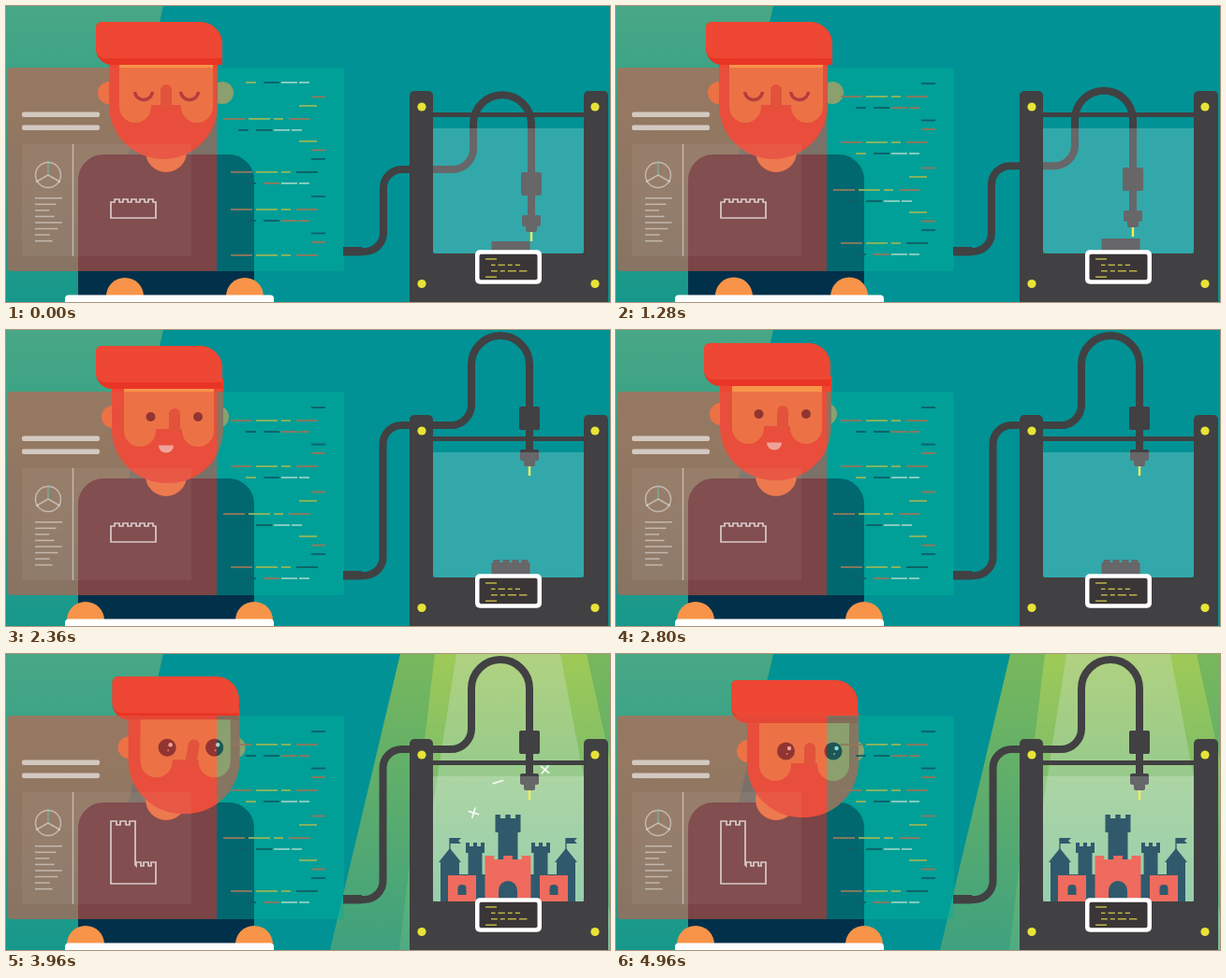
An HTML page with a canvas that plays this animation: 645 by 317 pixels, repeating every 5 s.

```html
<!DOCTYPE html>
<html lang="en">
<head>
<meta charset="utf-8">
<title>3D printing</title>
<style>
html, body { margin: 0; width: 100%; height: 100%; overflow: hidden; background: #009294; }
canvas { display: block; }
</style>
</head>
<body>
<canvas id="stage" width="645" height="317"></canvas>
<script>
const c = document.getElementById('stage').getContext('2d');
const LOOP = 5000, DARK = '#414042', SKIN = '#f7944a', RED = '#ee4733', NAVY = '#305a6c', CORAL = '#ef6b5e';

const clamp = v => Math.max(0, Math.min(1, v));
const mix = (a, b, p) => a + (b - a) * p;
const ramp = (t, from, to) => {
  const p = clamp((t - from) / (to - from));
  return p * p * (3 - 2 * p);
};
const random = i => Math.abs(Math.sin(i * 127.1 + 3) * 43758.5) % 1;

function box(x, y, w, h, fill, r = 0) {
  c.fillStyle = fill;
  c.beginPath();
  c.roundRect(x, y, w, h, r);
  c.fill();
}
function arc(x, y, r, fill, end = 7) {
  c.fillStyle = fill;
  c.beginPath();
  c.arc(x, y, r, 0, end);
  c.fill();
}
function poly(fill, ...p) {
  c.fillStyle = fill;
  c.beginPath();
  for (let i = 0; i < p.length; i += 2) c.lineTo(p[i], p[i + 1]);
  c.fill();
}
function line(color, width, x0, y0, x1, y1) {
  c.strokeStyle = color;
  c.lineWidth = width;
  c.beginPath();
  c.moveTo(x0, y0);
  c.lineTo(x1, y1);
  c.stroke();
}
function group(draw, alpha = 1) {
  c.save();
  c.globalAlpha = alpha;
  draw();
  c.restore();
}

// Beam from the top edge to the bottom edge with a vertical gradient
function beam(alpha, top, bottom, topLeft, topRight, bottomLeft, bottomRight) {
  const fill = c.createLinearGradient(0, 0, 0, 317);
  fill.addColorStop(0, top);
  fill.addColorStop(1, bottom);
  group(() => poly(fill, topLeft, 0, topRight, 0, bottomRight, 317, bottomLeft, 317), alpha);
}

function background(t) {
  box(0, 0, 645, 317, '#009294');
  beam(1, '#48a785', '#17988b', 0, 168, 0, 94);
  const on = clamp((t - 3360) / 110), spread = ramp(t, 3480, 3760);
  beam(on * mix(.15, 1, spread), '#78b85c', '#3fa17e', 421, 660, 346, 660);
  beam(on, mix(0, 1, spread) > .5 ? '#9fca57' : '#6fb658', '#4fab82',
    mix(448, 458, spread), mix(660, 620, spread), mix(374, 420, spread), 690);
  beam(spread, '#b0d280', '#74bf9e', 481, 592, 432, 652);
}

// Continues the current path with n merlons of the given width and gap
function merlons(n, x, y, width, gap, height) {
  for (let i = 0; i < n; i++) {
    const left = x + i * (width + gap), right = left + width;
    c.lineTo(left, y + height);
    c.lineTo(left, y);
    c.lineTo(right, y);
    c.lineTo(right, y + height);
  }
}

function shirtIcon(t) {
  c.strokeStyle = '#fff';
  c.lineWidth = 1.7;
  c.beginPath();
  if (t < 3700) {
    c.moveTo(112, 227);
    c.lineTo(112, 210);
    merlons(5, 116, 207, 5, 4, 3);
    c.lineTo(160, 210);
    c.lineTo(160, 227);
  } else {
    c.moveTo(112, 246);
    merlons(3, 112, 179, 6, 4, 4);
    c.lineTo(138, 226);
    merlons(3, 139, 223, 5, 3, 4);
    c.lineTo(160, 246);
  }
  c.closePath();
  c.stroke();
}

function eye(x, t) {
  const wide = ramp(t, 3640, 3860);
  if (t < 1740) {
    c.strokeStyle = '#7f2035';
    c.lineWidth = 3.5;
    c.beginPath();
    c.arc(x, 91, 9.5, .1, Math.PI - .1);
    c.stroke();
    return;
  }
  arc(x, 93, mix(5, 9.5, wide), '#33101f');
  arc(x + 3.5, 90, 2.2 * wide, '#fff');
  arc(x + 1, 96, wide, '#d9a9a0');
}

function head(t) {
  const awake = ramp(t, 1680, 1800), look = ramp(t, 3780, 4080);
  const nod = Math.sin(Math.PI * clamp((t - 2640) / 320));
  c.translate(27 * look - 2 * nod, 11 * look - 3 * nod);
  arc(110 + 4 * awake, 93, 12, SKIN);
  arc(231 - 5 * awake, 93, 12, SKIN);
  box(110 + 3 * awake, 52, 116 + 3 * awake, 112, RED, [0, 0, 58, 58]);
  const left = 121 + 5 * awake, right = 187 + awake;
  box(left, 58, right + 34 - left, 48, SKIN);
  for (const x of [left, right]) box(x, 80, 34, 45, SKIN, [0, 0, 17, 17]);
  group(() => {
    c.translate(171 + 9 * awake, 107);
    c.rotate(.2 * Math.sin(Math.PI * look));
    box(-6, -23, 12, 25, '#e44e32', [6, 6, 0, 0]);
  });
  eye(147 + 7.5 * awake, t);
  eye(196 + 9 * awake, t);
  if (t < 2240) arc(176, 125, 4.8 * ramp(t, 1760, 1840), '#fee');
  else if (t < 3720) arc(171, 123.5, 8, '#fff', Math.PI);
  box(96, 17, 135, 46, '#e93525', [6, 24, 0, 17]);
  box(96, 17, 135, 39, RED, [6, 24, 0, 10]);
}

const INK = { r: '#94785c', y: '#93b65a', d: '#0e6066', w: '#90d0c2' };
// Pairs of code lines: top, left, inks of both lines, inks of the marks above
const PAIRS = [[121, 232, 'ryyr', 'ddww', 'yr'], [178, 240, 'ryyd', 'drww', 'dry'],
  [218, 240, 'ryyr', 'ddrr', 'd'], [267, 240, 'ryyr', 'ydww', 'rd']];
function code(t) {
  const scroll = Math.min(121, t * .1);
  const dash = (ink, x, y, w) => {
    const wrapped = 75 + (y - 75 - scroll + 394) % 197;
    box(x, wrapped - .9, w, 1.8, INK[ink]);
  };
  group(() => {
    c.beginPath();
    c.rect(225, 75, 136, 197);
    c.clip();
    for (const [y, x, long, short, marks] of PAIRS) {
      [...long].forEach((ink, i) => dash(ink, x + i * 27 - (i > 2 ? 11 : 0), y, i === 2 ? 10 : 23));
      [...short].forEach((ink, i) => dash(ink, x + 16 + i * 19, y + 12, i % 3 ? 17 : 11));
      [...marks].forEach((ink, i) => dash(ink, ink === 'y' ? 313 : 326, y - 14 - i * 9.5, ink === 'y' ? 19 : 15));
    }
  });
}

function panels(t) {
  box(2, 66, 223, 218, 'rgba(228,86,68,.54)', [3, 0, 0, 3]);
  box(225, 66, 136, 218, 'rgba(0,175,156,.44)', [0, 3, 3, 0]);
  box(17, 148, 181, 120, 'rgba(255,255,255,.05)');
  for (const y of [113.5, 127.5]) box(17, y, 83, 5.5, 'rgba(255,255,255,.6)', 2);
  group(() => {
    line('#fff', 1.5, 71.5, 148, 71.5, 268);
    c.beginPath();
    c.arc(45, 181, 13.5, 0, 7);
    c.stroke();
    for (let i = 0; i < 3; i++) {
      const a = Math.PI * (2 * i / 3 - .5);
      line(i ? '#fff' : '#5fe0c0', 1.5, 45, 181, 45 + 15 * Math.cos(a), 181 + 15 * Math.sin(a));
    }
    for (let i = 0; i < 8; i++) box(31, 205 + i * 6.55, 22 + 7 * Math.cos(i * 1.5), 1.5, '#fff');
  }, .45);
  group(() => shirtIcon(t), .7);
  code(t);
}

function person(t) {
  box(77, 159, 188, 158, '#00304a', [27, 27, 0, 0]);
  arc(171, 156, 22, SKIN);
  group(() => head(t));
  panels(t);
  const rest = ramp(t, 1640, 1800), sway = Math.cos(t / 760 * Math.PI);
  const tap = (1 - sway) * (1 - rest);
  arc(mix(124.5 + 2.5 * sway, 85, rest), 311 - tap, 20, SKIN);
  arc(mix(242 + 13 * sway, 265, rest), 311 - tap, 20, SKIN);
  box(63, 309.5, 223, 12, '#fff', 4);
}

function printHead(t) {
  const x = mix(541 + 20 * Math.cos(Math.min(t, 1520) / 760 * Math.PI), 559, ramp(t, 1520, 2200)) - 6 * Math.sin(Math.PI * ramp(t, 1520, 2200));
  const y = mix(mix(178, 173, ramp(t, 0, 760)), 82, ramp(t, 1860, 2280));
  const top = 6 + (y - 82) * .93, level = 102 + (y - 82) * .76;
  const bend = 403 - (561 - x) * .225, rise = x - 62;
  c.strokeStyle = DARK;
  c.lineWidth = 8;
  c.beginPath();
  c.moveTo(362, 263);
  c.arcTo(bend, 263, bend, level, 20);
  c.arcTo(bend, level, rise, level, 20);
  c.arcTo(rise, level, rise, top, 22);
  c.arc(x - 31, top + 31, 31, Math.PI, 0);
  c.lineTo(x, y + 48);
  c.stroke();
  box(360, 258, 20, 9.5, DARK);
  box(x - 11, y, 22, 25, DARK, 2);
  box(x - 10, y + 46, 20, 12, DARK, 2);
  box(x - 6, y + 56, 12, 8, DARK, 2);
  box(x - 1.2, y + 64, 2.4, 10, '#f0e832');
}

function brick(t) {
  if (t >= 3700) return;
  const lift = ramp(t, 3080, 3400);
  const height = mix(10, 13, ramp(t, 0, 760)) + 2 * lift;
  c.translate(539 - 2 * lift, mix(262, 226, lift));
  c.rotate(.4 * lift);
  box(-20.5, -height, 41, height, DARK);
  for (let i = 0; i < 4; i++) box(i * 10 - 18.5, 1 - height, 7, -4 * ramp(t, 1300, 1800), DARK);
}

function tower(x, y, w, h, fill) {
  const step = w / 5;
  c.fillStyle = fill;
  c.beginPath();
  merlons(3, x - w / 2, y, step, step, 4);
  c.lineTo(x + w / 2, y + h);
  c.lineTo(x - w / 2, y + h);
  c.fill();
}

function castle(t) {
  const p = clamp((t - 3680) / 180);
  if (!p) return;
  c.translate(536, 265);
  c.scale(1, p + .25 * Math.sin(p * Math.PI));
  box(-52, -29, 104, 29, NAVY);
  tower(0, -93, 27, 19, NAVY);
  box(-10.5, -76, 21, 40, NAVY);
  for (const side of [-1, 1]) {
    tower(side * 35, -63, 20, 11, NAVY);
    box(side * 35 - 7.5, -53, 15, 40, NAVY);
    const x = side * 62;
    line(NAVY, 1.3, x, -68, x, -55);
    poly(NAVY, x, -68, x + 12, -68, x + 9, -65, x + 12, -62, x, -62);
    poly(NAVY, x, -57, x + 12, -42, x - 12, -42);
    box(x - 10, -43, 20, 43, NAVY);
    box(side * 49 - 15, -28, 30, 28, CORAL);
    box(side * 49 - 4.5, -18, 9, 11, NAVY, [4, 4, 0, 0]);
  }
  tower(0, -49, 49, 49, CORAL);
  box(-10, -22, 20, 22, NAVY, [10, 10, 0, 0]);
}

function sparks(t) {
  const show = ramp(t, 3300, 3460) * (1 - ramp(t, 3600, 3700));
  for (let i = 0; i < 8; i++) group(() => {
    c.translate(539, 209);
    c.rotate((15 + i * 45) * Math.PI / 180);
    const r = mix(20, 34, show);
    line('#fff', 2.4, r, 0, r + 10, 0);
  }, show);

  const burst = 1.34 * (1 - (1 - clamp((t - 3700) / 700)) ** 3);
  for (let i = 0; i < 3; i++) group(() => {
    const angle = (230 + i * 31.5) * Math.PI / 180, r = (58 + i * 20) * burst;
    c.translate(537 + r * Math.cos(angle), 215 + r * Math.sin(angle));
    c.rotate(i + .6 + t / 900);
    line('#fff', 1.8, -6, 0, 6, 0);
    if (i !== 1) line('#fff', 1.8, 0, -6, 0, 6);
  }, .85 * ramp(t, 3700, 3760) * (1 - ramp(t, 4000, 4300)));
}

function glass(t) {
  box(456, 131, 161, 134, 'rgba(255,255,255,.2)', [0, 0, 4, 4]);
  c.beginPath();
  c.rect(456, 131, 161, 134);
  c.clip();
  const x = 471 + (t - 3480) * .9;
  poly('rgba(255,255,255,.85)', x, 131, x + 38, 131, x - 12, 265, x - 50, 265);
}

function screen() {
  box(501, 261.3, 71, 36.5, '#fff', 5);
  box(505.5, 265.8, 62, 27.5, '#3a3536', 2);
  for (let row = 0; row < 4; row++) {
    const inner = row % 3 > 0;
    for (let x = inner ? 518 : 512, i = row * 9; x < (inner ? 552 : 516); i++) {
      const w = inner ? 4 + 6 * random(i) : 12;
      box(x, 270.3 + row * 6.4, w, 1.4, '#c6bd48');
      x += w + 3;
    }
  }
}

function printer(t) {
  printHead(t);
  box(456, 114, 161, 5, DARK);
  box(431, 91, 25, 226, DARK, [5, 5, 0, 0]);
  box(617, 91, 26, 226, DARK, [5, 5, 0, 0]);
  box(431, 265, 212, 52, DARK);
  group(() => brick(t));
  group(() => glass(t));
  group(() => castle(t));
  sparks(t);
  for (const x of [444, 629]) for (const y of [108, 297.5]) arc(x, y, 4.6, '#e8e337');
  screen();
}

function frame() {
  const t = performance.now() % LOOP;
  background(t);
  person(t);
  printer(t);
  requestAnimationFrame(frame);
}
frame();
</script>
</body>
</html>
```
